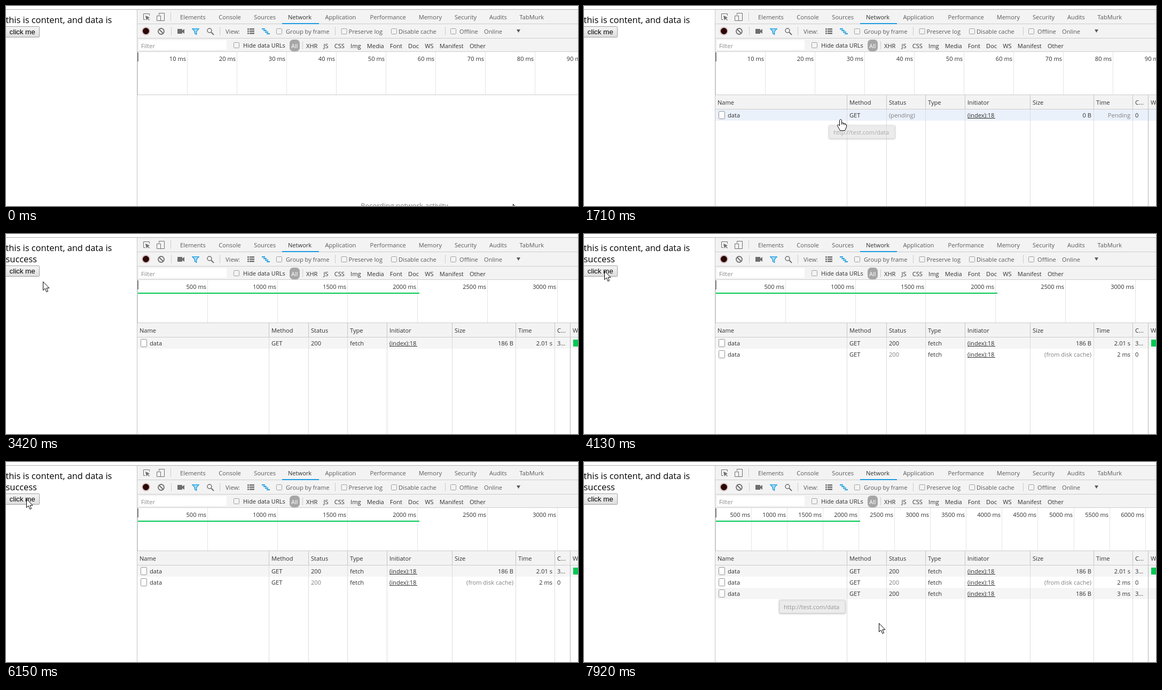
An HTML page with a canvas that plays this animation: 1071x375 px, repeating every 8 s.

```html
<!DOCTYPE html>
<html lang="en">
<head>
<meta charset="utf-8">
<title>Network panel</title>
<style>
  html, body { margin: 0; width: 100%; height: 100%; overflow: hidden; background: #fff; }
  canvas { display: block; }
</style>
</head>
<body>
<canvas id="stage" width="1071" height="375"></canvas>
<script>
const W = 1071, H = 375, LEFT = 246, ROWS = 194, ROW = 21, LOOP = 8000, STEP = 78;
const ctx = document.getElementById('stage').getContext('2d');
const UI = '"Open Sans", "Noto Sans", sans-serif';
const INK = '#303030', ICON = '#6e6e6e', TAB = '#5a5a5a', DIM = '#808080', LINE = '#ccc';
const PANEL = '#f3f3f3', BLUE = '#1a9be0', GREEN = '#00c853';
const COLUMNS = [492, 566, 639, 713, 835, 954, 1027, 1056];

// Moments when the page changes
const SENT = 850, DONE = 2873, CACHED = 4130, AGAIN = 7080, RESCALED = 7180;

// Pointer moves: start, end, target
const MOVES = [
  [70, 772, 41, 46], [1080, 1310, 88, 119], [1460, 1700, 480, 212], [1780, 2180, 641, 229],
  [2320, 2790, 201, 156], [2873, 3110, 99, 108], [3200, 3590, 38, 69], [4450, 4766, 360, 226],
  [4845, 5240, 898, 225], [5460, 6150, 38, 69], [7780, 7920, 552, 302]
];

// Tooltips: start, end, left, top
const TIPS = [[1600, 1950, 458, 223], [4680, 4900, 345, 245], [7790, LOOP, 365, 258]];

function rect(x, y, w, h, color) {
  ctx.fillStyle = color;
  ctx.fillRect(x, y, w, h);
}

function text(s, x, y, color = INK, align = 'left', size = 11.1, family = UI) {
  ctx.font = `${size}px ${family}`;
  ctx.textAlign = align;
  ctx.fillStyle = color;
  ctx.fillText(s, x, y);
}

// Places words between two edges with equal gaps
function spread(words, from, to, y, color) {
  ctx.font = `11.1px ${UI}`;
  const widths = words.map(s => ctx.measureText(s).width);
  const gap = (to - from - widths.reduce((a, b) => a + b)) / (words.length - 1);
  words.forEach((s, i) => {
    text(s, from, y, color);
    from += widths[i] + gap;
  });
}

function box(x, y, w, h, fill, stroke, r = 1) {
  ctx.beginPath();
  ctx.roundRect(x + .5, y + .5, w - 1, h - 1, r);
  ctx.fillStyle = fill;
  ctx.fill();
  ctx.strokeStyle = stroke;
  ctx.lineWidth = 1;
  ctx.stroke();
}

function path(d, stroke, width = 1, fill) {
  const p = new Path2D(d);
  if (fill) { ctx.fillStyle = fill; ctx.fill(p); }
  if (stroke) { ctx.strokeStyle = stroke; ctx.lineWidth = width; ctx.stroke(p); }
}

function ring(x, y, r, stroke, width, fill = 'transparent') {
  ctx.beginPath();
  ctx.arc(x, y, r, 0, 7);
  ctx.fillStyle = fill;
  ctx.fill();
  ctx.strokeStyle = stroke;
  ctx.lineWidth = width;
  ctx.stroke();
}

function checkbox(label, x, y, indent, color) {
  box(x - indent, y - 10, 11, 11, '#f4f4f4', '#a0a0a0');
  text(label, x, y, color);
}

function pointerAt(t) {
  let x = 949, y = 371, shown = 0;
  for (const [start, end, toX, toY] of MOVES) {
    if (t < start) break;
    const gaps = Math.round((end - start) / STEP);
    const k = Math.min(gaps, Math.floor((t - start) / (end - start) * gaps));
    const f = (k + 1) / (gaps + 1), ease = f * f * (3 - 2 * f);
    x = Math.round(x + (toX - x) * ease);
    y = Math.round(y + (toY - y) * ease);
    shown = start + k * (end - start) / gaps;
  }
  return { x, y, shown };
}

function drawPage(t) {
  const done = t >= DONE, top = done ? 59 : 38;
  const pressed = [SENT, CACHED, AGAIN].some(click => t < click && t >= click - STEP * 2 + 66);
  text('this is content, and data is', -.5, 32, '#000', 'left', 16.4);
  if (done) text('success', -.5, 53, '#000', 'left', 16.4);
  const shade = ctx.createLinearGradient(0, top, 0, top + ROW);
  shade.addColorStop(0, pressed ? '#d4d4d4' : '#f6f6f6');
  shade.addColorStop(1, pressed ? '#eee' : '#ddd');
  box(-3, top, 66, ROW, shade, '#a0a0a0');
  text('click me', 6.5, top + 15, '#000', 'left', 13.333, '"Liberation Sans", sans-serif');
  rect(0, 6, W, 1, '#b0b0b0');
  rect(LEFT - 1, 7, 1, H, '#c4c4c4');
}

function drawTabs() {
  rect(LEFT, 7, W, 79, PANEL);
  for (const y of [33, 60, 85]) rect(LEFT, y, W, 1, LINE);
  path('M261 25.5H257.5V14.5H268.5V18', ICON);
  path('M261 18L269 21.5L266 23L269 26L268 27L265 24L263 27Z', null, 1, ICON);
  path('M286.5 17V13.5H296.5V27.5H282.5V18.5H289.5V27', ICON);
  rect(308, 12, 1, 16, LINE);
  spread(['Elements', 'Console', 'Sources'], 326, 505, 25, TAB);
  text('Network', 528, 25);
  text('Application', 597.5, 25, TAB);
  spread(['Performance', 'Memory', 'Security', 'Audits', 'TabMurk'], 681.5, 1007, 25, TAB);
  rect(517, 32, 69, 2, BLUE);
}

function drawToolbar() {
  ring(262, 47, 7, '#dcc8c8', 2, '#2c0505');
  ring(290.5, 47.5, 5.5, ICON, 1.8);
  path('M287 44l7 7', ICON, 1.8);
  path('M321 43h9v3l4-3v9l-4-3v3h-9z', null, 1, ICON);
  path('M349 42.7h12l-4.4 5v5.6l-3.2-2v-3.6z', BLUE, 1.3, '#a9dcf6');
  ring(381, 46, 4, ICON, 1.5);
  path('M384 49l5 5', ICON, 2);
  for (const x of [309, 400, 616, 822]) rect(x, 39, 1, 16, LINE);
  for (let i = 0; i < 4; i++) {
    rect(479 + 3 * i, 42 + 3 * i, 6, 2, BLUE);
    if (i < 3) rect(452, 42 + 4 * i, 13, 2.5, ICON);
  }
  rect(455, 42, 1, 11, PANEL);
  text('View:', 411, 52, TAB);
  checkbox('Group by frame', 524, 52, 18, TAB);
  checkbox('Preserve log', 641.5, 52, 14, TAB);
  checkbox('Disable cache', 735, 52, 14, TAB);
  checkbox('Offline', 849, 52, 17, TAB);
  text('Online', 895, 52, TAB);
  path('M956 44h7l-3.5 6z', null, 1, TAB);

  rect(249, 64, 164, 18, '#fff');
  text('Filter', 253, 79, '#8a8a8a');
  checkbox('Hide data URLs', 444, 78, 18);
  box(531, 63, 19, 22, '#a6a6a6', '#a6a6a6', 6);
  text('All', 534, 79, '#fff');
  rect(555, 66, 1, 15, LINE);
  spread(['XHR', 'JS', 'CSS', 'Img', 'Media', 'Font', 'Doc', 'WS', 'Manifest', 'Other'], 562, 898, 79);
}

function drawTimeline(t) {
  const [gap, unit, bar] = t >= RESCALED ? [67.1, 500, 270] : t >= DONE ? [131, 500, 527] : [93.1, 10, 0];
  for (let i = 1; i * gap < W - LEFT + gap; i++) {
    const x = Math.floor(LEFT + i * gap);
    rect(x, 86, 1, 80, '#e4e4e4');
    text(`${i * unit} ms`, x - 2, 103, INK, 'right');
  }
  rect(LEFT, 86, 1, 80, LINE);
  rect(LEFT, 87, 2, 17, DIM);
  rect(LEFT + 1, 110, bar, 2, GREEN);
  rect(LEFT, 166, W, 1, LINE);
}

function requests(t) {
  const list = [];
  if (t >= DONE) list.push(['200', 'fetch', '186 B', '2.01 s', '3...']);
  else if (t >= SENT) list.push(['(pending)', '', '0 B', 'Pending', '0']);
  if (t >= CACHED) list.push(['200', 'fetch', '(from disk cache)', '2 ms', '0']);
  if (t >= AGAIN) list.push(['200', 'fetch', '186 B', '3 ms', '3...']);
  return list;
}

function drawTable(t, list, mouse) {
  if (!list.length) {
    text('Recording network activity', 746, 379, DIM, 'center', 13.3);
    return;
  }
  rect(LEFT, 167, W, 27, PANEL);
  list.forEach((_, i) => {
    const y = ROWS + ROW * i;
    const hover = mouse.x > LEFT && mouse.y >= y && mouse.y < y + ROW;
    if (hover || i % 2 === 0) rect(LEFT, y, W, ROW, hover ? '#ebf1fa' : '#f5f5f5');
  });
  rect(LEFT, ROWS - 1, W, 1, LINE);
  const titles = ['Method', 'Status', 'Type', 'Initiator', 'Size', 'Time', 'C...', 'W'];
  text('Name', 250, 185);
  COLUMNS.forEach((x, i) => {
    rect(x, 167, 1, 27, '#c4c4c4');
    rect(x, ROWS, 1, H, i === 7 ? '#b4b4b4' : '#dcdcdc');
    text(titles[i], x + 5, 185);
  });
  list.forEach(([status, type, size, time, id], i) => {
    const y = ROWS + 15 + ROW * i;
    const cached = size[0] === '(', waiting = time === 'Pending';
    const cells = ['GET', status, type, '(index):18', size, time, id];
    box(252, y - 12, 12, 15, '#fff', '#929292');
    text('data', 269, y);
    cells.forEach((s, c) => {
      const color = cached && (c === 1 || c === 4) || waiting && (c === 1 || c === 5) ? DIM : INK;
      const right = c === 4 || c === 5;
      text(s, right ? COLUMNS[c + 1] - 4 : COLUMNS[c] + 5, y, color, right ? 'right' : 'left');
    });
    rect(718, y + 1, 52, 1, INK);
  });
  if (t >= DONE) rect(1062, 198, 9, 13, GREEN);
}

function drawTip(t, shown) {
  for (const [start, end, x, y] of TIPS) {
    if (shown < start || t >= end) continue;
    ctx.save();
    ctx.globalAlpha = Math.min(1, (shown - start) / 220);
    ctx.shadowColor = 'rgba(0,0,0,.3)';
    ctx.shadowBlur = 3;
    ctx.shadowOffsetY = 1;
    box(x, y, 125, 26, '#fff', '#c8c8c8', 2);
    ctx.shadowColor = 'transparent';
    text('http://test.com/data', x + 9, y + 18, '#575757');
    ctx.restore();
  }
}

function drawPointer({ x, y }, rows) {
  const onName = x > LEFT && x < COLUMNS[0] && y >= ROWS && y < ROWS + ROW * rows;
  ctx.save();
  ctx.translate(x + .5, y + .5);
  if (onName) path('M-2 12V2Q0-2 2 2V6L5 7L8 8L11 10V14L8 21H-1L-6 12Q-6 8-2 12M2 6v4M5 7v3M8 8v3', '#000', 1, '#fff');
  else path('M0 0V16L3.6 12.6L6.3 19L9 18L6.4 11.8H11.4Z', '#000', 1, '#fff');
  ctx.restore();
}

function frame(now) {
  const t = now % LOOP, mouse = pointerAt(t), list = requests(t);
  rect(0, 0, W, H, '#fff');
  drawPage(t);
  drawTabs();
  drawToolbar();
  drawTimeline(t);
  drawTable(t, list, mouse);
  drawTip(t, mouse.shown);
  drawPointer(mouse, list.length);
  requestAnimationFrame(frame);
}
requestAnimationFrame(frame);
</script>
</body>
</html>
```
